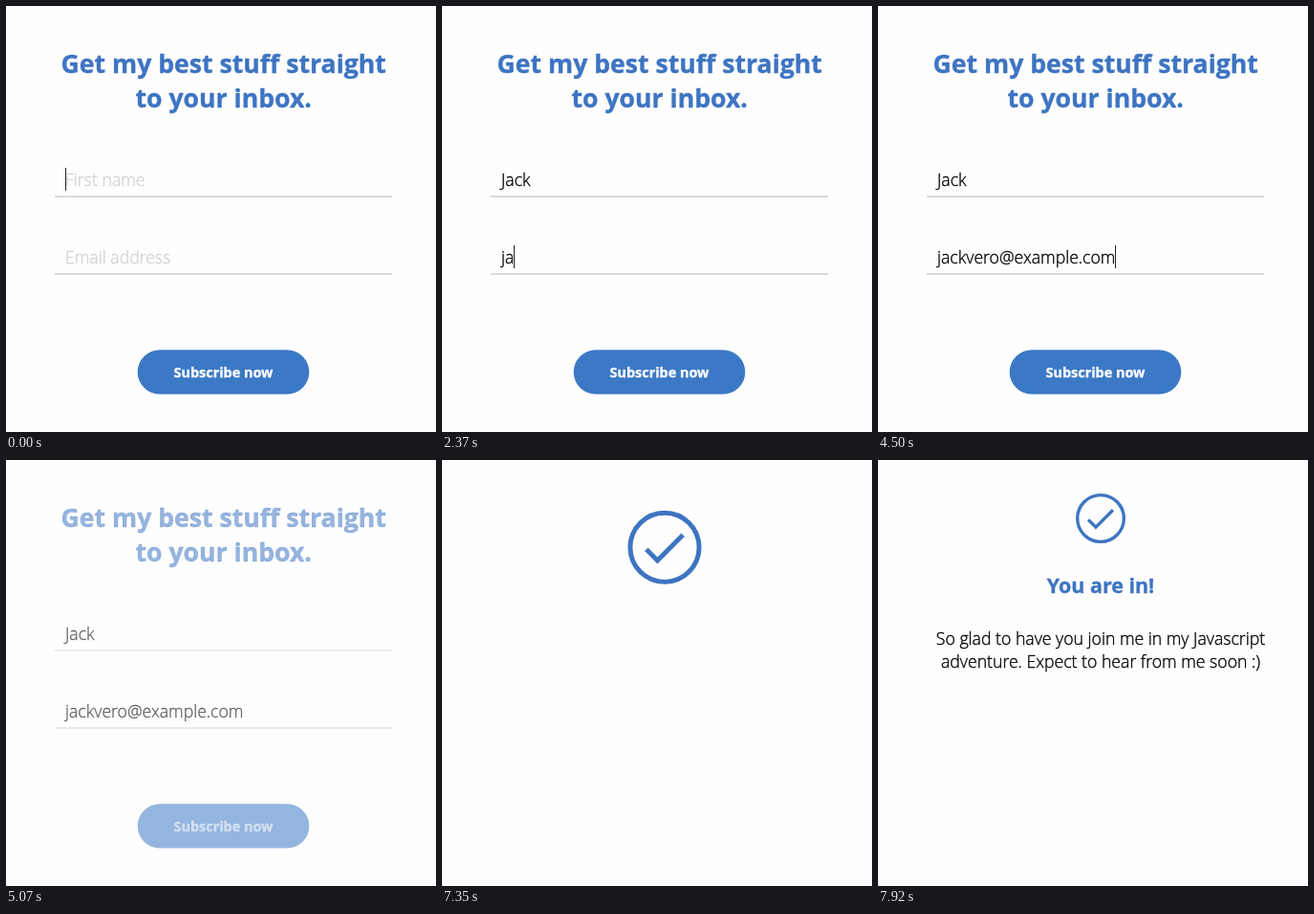
An HTML page with a canvas that plays this animation: 450 by 445 pixels, repeating every 8000 ms.

```html
<!DOCTYPE html>
<html lang="en">
<head>
<meta charset="utf-8">
<title>Subscribe form</title>
<style>
  html, body { margin: 0; width: 100%; height: 100%; overflow: hidden; background: #fefefe; }
  canvas { display: block; width: 450px; height: 445px; }
</style>
</head>
<body>
<canvas id="stage"></canvas>
<script>
const W = 450, H = 445, LOOP = 8000;
const BLUE = '#3d74c2', INK = '#000', HINT = '#d0d0d0', RULE = '#dadada';
const FAMILY = '"Open Sans", "Noto Sans", sans-serif';
const BODY = `300 17.65px ${FAMILY}`;

const canvas = document.getElementById('stage');
const ctx = canvas.getContext('2d');
const dpr = window.devicePixelRatio || 1;
canvas.width = W * dpr;
canvas.height = H * dpr;

const NAME = { hint: 'First name', value: 'Jack', base: 188, focus: 0, blur: 1680, start: 900, step: 140 };
const EMAIL = { hint: 'Email address', value: 'jackvero@example.com', base: 269, focus: 1680, blur: 4920, start: 2240, step: 112 };

const clamp = v => Math.min(1, Math.max(0, v));
const span = (t, from, to) => clamp((t - from) / (to - from));
const lerp = (a, b, p) => a + (b - a) * p;
const easeInOut = p => p < 0.5 ? 4 * p ** 3 : 1 - (2 - 2 * p) ** 3 / 2;

// A hairline stroke gives the slightly heavy look of smoothed type.
function text(str, x, y, font, color, align = 'center') {
  ctx.font = font;
  ctx.letterSpacing = '0.01px'; // any spacing turns ligatures off
  ctx.fillStyle = ctx.strokeStyle = color;
  ctx.lineWidth = 0.35;
  ctx.lineJoin = 'round';
  ctx.textAlign = align;
  ctx.fillText(str, x, y);
  ctx.strokeText(str, x, y);
}

function caretOn(f, t) {
  if (t < f.focus || t >= f.blur) return false;
  const lastKey = f.start + (f.value.length - 1) * f.step;
  if (t >= f.start && t < lastKey) return true;
  const since = t < f.start ? f.focus : lastKey;
  return (t - since) % 1000 < 500;
}

function field(f, t) {
  const typed = t < f.start ? 0 : Math.floor((t - f.start) / f.step) + 1;
  const value = f.value.slice(0, typed);
  text(value || f.hint, 62, f.base, BODY, value ? INK : HINT, 'left');
  if (caretOn(f, t)) {
    const x = 62 + Math.round(ctx.measureText(value).width);
    ctx.fillStyle = '#222';
    ctx.fillRect(x, f.base - 19, 1, 24);
  }
  ctx.fillStyle = RULE;
  ctx.fillRect(51, f.base + 10, 353, 2);
}

function form(t) {
  const heading = `700 26.6px ${FAMILY}`;
  text('Get my best stuff straight', 227.7, 70, heading, BLUE);
  text('to your inbox.', 227.7, 106, heading, BLUE);
  field(NAME, t);
  field(EMAIL, t);
  ctx.fillStyle = '#3b79c6';
  ctx.beginPath();
  ctx.roundRect(137.7, 359.2, 179.6, 46.4, 23.2);
  ctx.fill();
  text('Subscribe now', 227.5, 388, `700 14.4px ${FAMILY}`, '#fff');
}

// Strokes the first part p of a two-segment tick.
function tick(p) {
  const [a, b, c] = [[-19.4, 2], [-7.6, 13.8], [19.4, -13.2]];
  const first = 0.3;
  const p1 = clamp(p / first), p2 = clamp((p - first) / (1 - first));
  ctx.beginPath();
  ctx.moveTo(...a);
  ctx.lineTo(lerp(a[0], b[0], p1), lerp(a[1], b[1], p1));
  if (p2 > 0) ctx.lineTo(lerp(b[0], c[0], p2), lerp(b[1], c[1], p2));
  ctx.stroke();
}

function badge(t) {
  const ring = easeInOut(span(t, 5220, 5750));
  const check = easeInOut(span(t, 5850, 6250));
  const rise = easeInOut(span(t, 7200, 7920));
  if (ring <= 0) return;
  const scale = lerp(1, 26 / 39, rise);
  ctx.save();
  ctx.translate(233, lerp(92.5, 61, rise));
  ctx.scale(scale, scale);
  ctx.strokeStyle = BLUE;
  ctx.lineWidth = 5;
  ctx.lineJoin = 'miter';
  ctx.beginPath();
  ctx.arc(0, 0, 36.5, -Math.PI / 2, -Math.PI / 2 + ring * 2 * Math.PI);
  ctx.stroke();
  if (check > 0) tick(check);
  ctx.restore();
}

function thanks() {
  text('You are in!', 233, 139, `700 21.4px ${FAMILY}`, BLUE);
  text('So glad to have you join me in my Javascript', 233, 193, BODY, INK);
  text('adventure. Expect to hear from me soon :)', 233, 217, BODY, INK);
}

function faded(alpha, draw) {
  if (alpha <= 0) return;
  ctx.globalAlpha = alpha;
  draw();
  ctx.globalAlpha = 1;
}

function render(t) {
  ctx.setTransform(dpr, 0, 0, dpr, 0, 0);
  ctx.fillStyle = '#fefefe';
  ctx.fillRect(0, 0, W, H);
  faded(1 - span(t, 4920, 5250), () => form(t));
  badge(t);
  faded(span(t, 7500, 7900), thanks);
}

function loop() {
  render(performance.now() % LOOP);
  requestAnimationFrame(loop);
}
loop();
</script>
</body>
</html>
```
